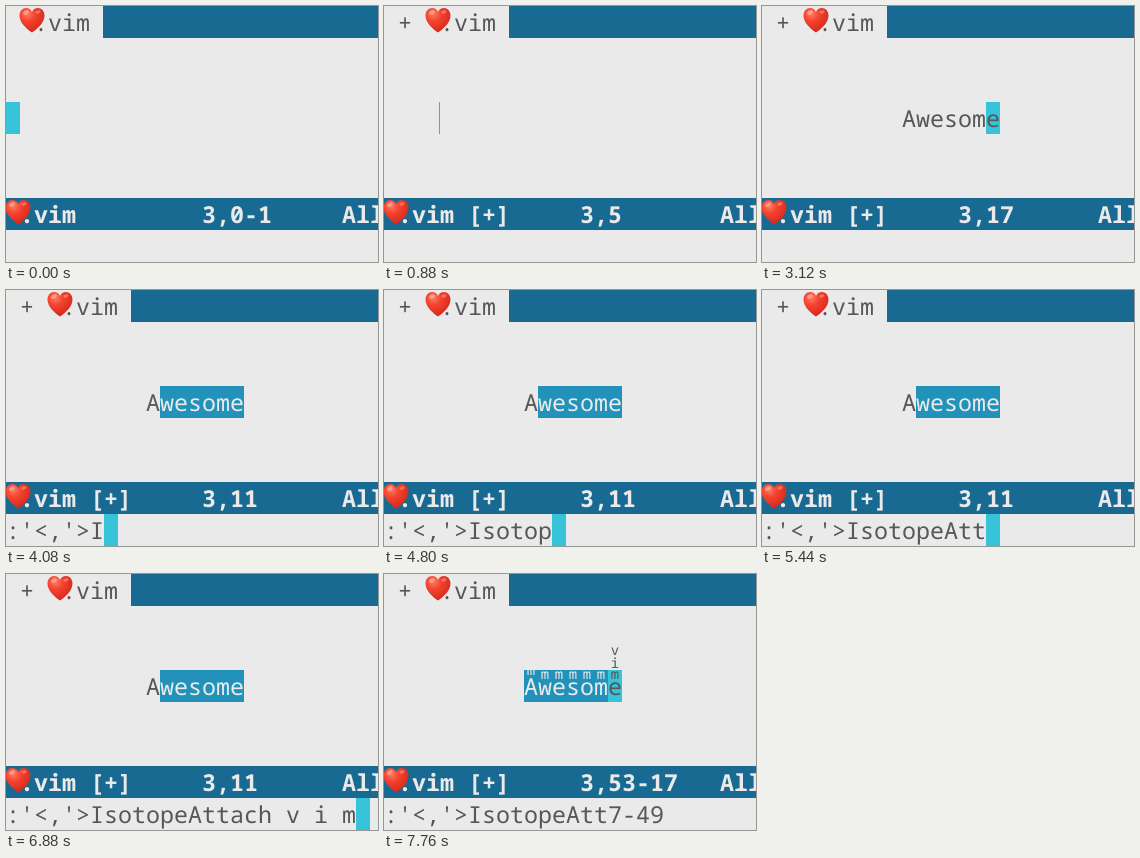
An HTML page that plays this animation: 372x256 px, repeating every 8000 ms.

```html
<!DOCTYPE html>
<html lang="en">
<head>
<meta charset="utf-8">
<title>Stacked letters in an editor</title>
<style>
  html, body { margin: 0; width: 100%; height: 100%; overflow: hidden; background: #eaeaea; }
  svg { display: block; width: 372px; height: 256px; }
  text {
    font: 300 23.333px "Noto Sans Mono", "DejaVu Sans Mono", monospace;
    font-variant-ligatures: none;
    white-space: pre;
    text-rendering: geometricPrecision;
  }
  text.bold { font-weight: 700; }
  text.mark { font-size: 14px; font-weight: 400; text-anchor: middle; }
</style>
</head>
<body>
<svg viewBox="0 0 372 256">
  <defs>
    <radialGradient id="red" cx=".32" cy=".25" r=".85">
      <stop offset="0" stop-color="#ff7c62"/>
      <stop offset=".35" stop-color="#f4432f"/>
      <stop offset="1" stop-color="#cf2418"/>
    </radialGradient>
    <g id="heart">
      <path fill="url(#red)" d="M12.5 25.5C8 22.5 0 16 0 8.500C0 4 3 1 6.700 1C9.500 1 11.500 2.500 12.500 5C13.500 2.500 15.500 1 18.300 1C22 1 25 4 25 8.500C25 16 17 22.500 12.500 25.500Z"/>
      <ellipse cx="6.500" cy="5.500" rx="3.200" ry="1.900" fill="#ffb8a4" opacity=".65" transform="rotate(-30 6.5 5.5)"/>
      <ellipse cx="18.500" cy="5" rx="2.600" ry="1.500" fill="#ffb8a4" opacity=".45" transform="rotate(-15 18.5 5)"/>
    </g>
    <clipPath id="line"><rect x="0" y="96" width="372" height="32"/></clipPath>
  </defs>
  <g id="screen"></g>
</svg>
<script>
const LOOP = 8000, CELL = 14, ROW = 32, INDENT = 10;
const INK = '#575757', PAPER = '#eaeaea', BAR = '#186a93', CURSOR = '#37c4da', SELECT = '#2392ba';
const WORD = 'Awesome', RANGE = ":'<,'>", COMMAND = 'IsotopeAttach v i m';
const screen = document.getElementById('screen');

const insertTimes = [640, 880, 1040, 1280, 1520];
const wordTimes = [1920, 2160, 2240, 2400, 2480, 2640, 2720];
const commandTimes = [
  4080, 4240, 4400, 4560, 4640, 4800, 4880,
  5200, 5360, 5440, 5600, 5680, 5840, 6000,
  6160, 6400, 6560, 6720, 6880
];

const passed = (times, t) => times.filter(time => time <= t).length;
const escape = s => s.replace(/&/g, '&amp;').replace(/</g, '&lt;').replace(/>/g, '&gt;');
const block = (col, row, cols, fill) =>
  `<rect x="${col * CELL}" y="${row * ROW}" width="${cols * CELL}" height="${ROW}" fill="${fill}"/>`;
const text = (s, col, row, fill = INK, style = '') =>
  `<text class="${style}" x="${col * CELL}" y="${row * ROW + 25}" fill="${fill}">${escape(s)}</text>`;
const heart = (col, row) => `<use href="#heart" x="${col * CELL - 0.5}" y="${row * ROW + 1}"/>`;

// The letters v, i, m piled on top of one character of the word.
function marks(index, fill) {
  const x = (INDENT + index + 0.5) * CELL;
  const lift = index === 0 ? 4 : 0;
  return [...'vim'].map((letter, i) =>
    `<text class="mark" x="${x}" y="${[81, 93.5, 104.5][i] - lift}" fill="${fill}">${letter}</text>`
  ).join('');
}

function stateAt(t) {
  const spaces = 2 * passed(insertTimes, t);
  const typed = passed(wordTimes, t);
  const last = INDENT + WORD.length - 1;
  const s = {
    word: WORD.slice(0, typed),
    modified: spaces > 0,
    position: t < 400 ? '3,0-1' : `3,${spaces + typed + 1}`,
    cursor: [0, 3],
    bar: null,
    selection: null,
    command: '',
    stacked: t >= 7200
  };
  if (t >= 400 && t < 3120) {
    s.cursor = null;
    s.bar = spaces + typed;
  } else if (t >= 3120 && t < 3440) {
    s.cursor = [last, 3];
    s.position = '3,17';
    if (t >= 3360) s.command = ' '.repeat(16) + '1';
  } else if (t >= 3440 && t < 7200) {
    s.cursor = [INDENT, 3];
    s.selection = [INDENT + 1, WORD.length - 1];
    s.position = '3,11';
    s.command = ' '.repeat(16) + '7';
    if (t >= 3840) {
      s.command = RANGE + COMMAND.slice(0, passed(commandTimes, t));
      s.cursor = [s.command.length, 7];
    }
  } else if (t >= 7200 && t < 7760) {
    s.cursor = [INDENT, 3];
    s.position = '3,11';
    s.command = RANGE + COMMAND;
  } else if (t >= 7760) {
    s.cursor = [last, 3];
    s.selection = [INDENT, WORD.length];
    s.position = '3,53-17';
    s.command = RANGE + COMMAND.slice(0, 10) + '7-49';
  }
  return s;
}

function drawWord(s) {
  return [...s.word].map((letter, i) => {
    const col = INDENT + i;
    const underCursor = s.cursor && s.cursor[1] === 3 && s.cursor[0] === col;
    const selected = s.selection && col >= s.selection[0] && !underCursor;
    const fill = selected ? PAPER : INK;
    const stack = s.stacked ? marks(i, fill) : '';
    return text(letter, col, 3, fill) + (selected ? `<g clip-path="url(#line)">${stack}</g>` : stack);
  }).join('');
}

function draw(t) {
  const s = stateAt(t);
  const heartCol = s.modified ? 3 : 1;
  const tabEnd = (heartCol + 6) * CELL - 1;
  const parts = [
    `<rect width="372" height="256" fill="${PAPER}"/>`,
    `<rect x="${tabEnd}" width="${372 - tabEnd}" height="${ROW}" fill="${BAR}"/>`,
    s.modified ? text('+', 1, 0) : '',
    heart(heartCol, 0),
    text('.vim', heartCol + 1, 0),
    `<rect y="192" width="372" height="${ROW}" fill="${BAR}"/>`,
    heart(0, 6),
    text('.vim' + (s.modified ? ' [+]' : ''), 1, 6, PAPER, 'bold'),
    text(s.position, 14, 6, PAPER, 'bold'),
    text('All', 24, 6, PAPER, 'bold'),
    s.selection ? block(s.selection[0], 3, s.selection[1], SELECT) : '',
    s.cursor ? block(...s.cursor, 1, CURSOR) : '',
    drawWord(s),
    s.bar === null ? '' : `<rect x="${Math.max(0, s.bar * CELL - 1)}" y="96" width="1" height="${ROW}" fill="#6f9fa8"/>`,
    text(s.command, 0, 7)
  ];
  return parts.join('');
}

const start = performance.now();
let shown = '';
function tick() {
  const picture = draw((performance.now() - start) % LOOP);
  if (picture !== shown) screen.innerHTML = shown = picture;
  requestAnimationFrame(tick);
}
tick();
</script>
</body>
</html>
```
